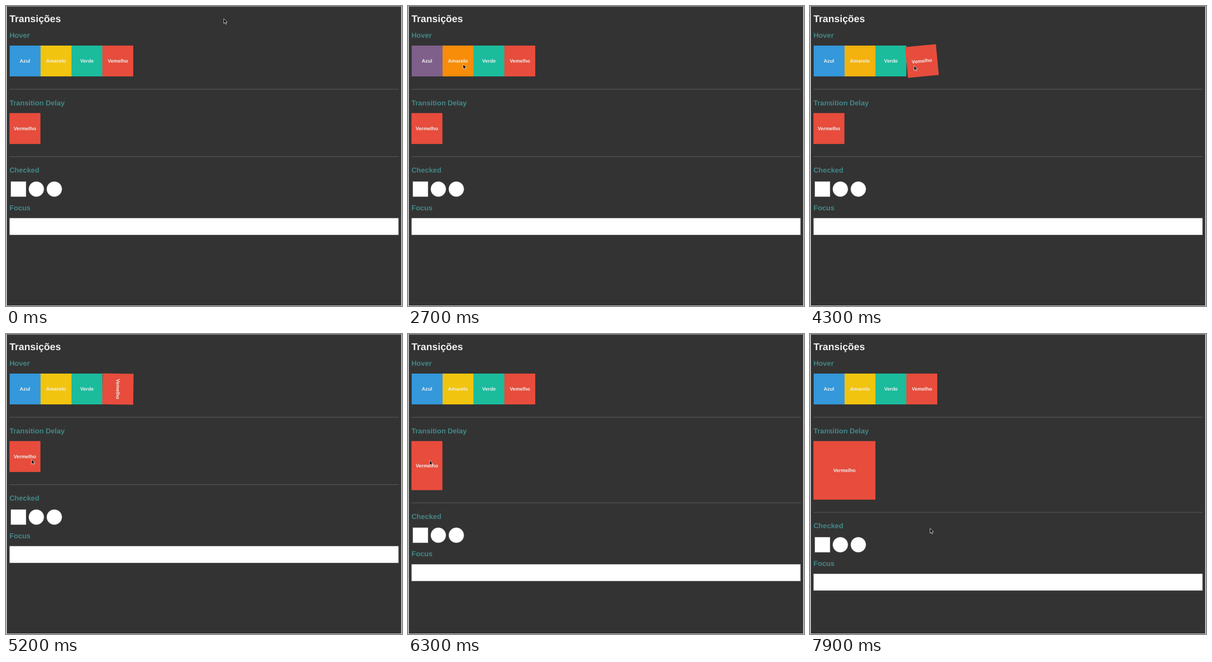
Recreate the animation shown at these times as an HTML page. Size 859 by 652 pixels, loop 8 s.

```html
<!DOCTYPE html>
<html lang="pt">
<head>
<meta charset="utf-8">
<title>Transições</title>
<style>
html, body { margin: 0; width: 100%; height: 100%; overflow: hidden; background: #333; }
svg { display: block; width: 859px; height: 652px; font-family: "Liberation Sans", Arial, sans-serif; font-weight: bold; text-rendering: geometricPrecision; }
.h1 { font-size: 21.4px; fill: #f0f0f0; }
.h2 { font-size: 15.55px; fill: #438787; }
.label { font-size: 10.75px; fill: #eef0f0; text-anchor: middle; }
.hr { fill: #565656; }
.field { fill: #fff; stroke: #8c8c8c; stroke-width: .6; }
.crisp { shape-rendering: crispEdges; }
</style>
</head>
<body>
<svg viewBox="0 0 859 652">
  <rect width="859" height="652" fill="#e6e6e6"/>
  <rect width="859" height="1.2" fill="#9a9a9a"/>
  <rect x="1.7" y="1.2" width="855.7" height="649.8" fill="#333"/>
  <text class="h1" x="7.4" y="35">Transições</text>
  <text class="h2" x="7.4" y="69.3">Hover</text>
  <g id="boxes"></g>
  <rect class="hr" x="7.5" y="180.2" width="844.5" height="1.4"/>
  <text class="h2" x="7.4" y="215.8">Transition Delay</text>
  <rect id="delay" x="7.5" y="232.7" fill="#e74c3c"/>
  <text id="delayText" class="label">Vermelho</text>
  <g id="lower">
    <rect class="hr" x="7.5" y="326.7" width="844.5" height="1.4"/>
    <text class="h2" x="7.4" y="362.4">Checked</text>
    <rect class="field" x="10.4" y="381.4" width="33" height="33"/>
    <circle class="field" cx="65.8" cy="397.9" r="16.5"/>
    <circle class="field" cx="104.8" cy="397.9" r="16.5"/>
    <text class="h2" x="7.4" y="444">Focus</text>
    <rect class="field" x="7.8" y="461" width="843.5" height="36.5"/>
  </g>
  <path id="cursor" d="M.4.5V11.1L2.9 8.8 4.5 12.6 6.2 11.9 4.6 8.1H8Z" fill="#0a0a0a" stroke="#fff" stroke-width=".8"/>
</svg>
<script>
const $ = id => document.getElementById(id);
const LOOP = 8000, STEP = 100, SIDE = 67.2, LEFT = 7.55, TOP = 86;
const mix = (a, b, p) => a + (b - a) * p;
const color = (a, b, p) => `rgb(${a.map((v, i) => Math.round(mix(v, b[i], p)))})`;

// CSS "ease": cubic-bezier(.25, .1, .25, 1), solved by bisection
function ease(x) {
  if (x <= 0) return 0;
  if (x >= 1) return 1;
  let lo = 0, hi = 1, s;
  for (let i = 0; i < 24; i++) {
    s = (lo + hi) / 2;
    if (.75 * s * (1 - s) + s ** 3 < x) lo = s; else hi = s;
  }
  return .3 * s * (1 - s) ** 2 + 3 * s * s * (1 - s) + s ** 3;
}

const run = (t, start, dur) => ease((t - start) / dur);

// Transition in, then back from wherever it got to
function hover(t, enter, leave, dur) {
  if (t < leave) return run(t, enter, dur);
  const peak = run(leave, enter, dur);
  return peak * (1 - run(t, leave, dur * peak));
}

// Stops of the pointer: time, x, y
const stops = [
  [0, 472, 27], [300, 468, 20], [1100, 33, 114], [2000, 54, 121], [2700, 119, 126],
  [3700, 201, 129], [4700, 238, 129], [5000, 108, 277], [5200, 55, 272],
  [5800, 46, 274], [7000, 47, 274], [7900, 260, 422]
];
function pointer(t) {
  const i = Math.max(1, stops.findIndex(s => s[0] >= t));
  const [a, b] = [stops[i - 1], stops[i]];
  const p = (1 - Math.cos(Math.PI * (t - a[0]) / (b[0] - a[0]))) / 2;
  return `translate(${mix(a[1], b[1], p)} ${mix(a[2], b[2], p)})`;
}

const [blue, yellow, green, red] = [
  ["Azul", "#3498db"], ["Amarelo", "#f1c40f"], ["Verde", "#1abc9c"], ["Vemelho", "#e74c3c"]
].map(([name, fill], i) => {
  const g = document.createElementNS("http://www.w3.org/2000/svg", "g");
  const h = SIDE / 2, cx = LEFT + SIDE * i + h, cy = TOP + h;
  g.innerHTML = `<rect x="${-h}" y="${-h}" width="${SIDE}" height="${SIDE}" fill="${fill}"/>` +
    `<text class="label" y="3.6">${name}</text>`;
  $("boxes").append(g);
  const rect = g.firstChild;
  const place = (extra = "") => g.setAttribute("transform", `translate(${cx} ${cy}) ${extra}`);
  place();
  return { g, rect, place, paint: c => rect.setAttribute("fill", c) };
});

function draw(t) {
  blue.paint(color([52, 152, 219], [255, 0, 0], hover(t, 1150, 2180, 2000)));
  yellow.paint(color([241, 196, 15], [255, 69, 0], hover(t, 2180, 3350, 2000)));
  green.place(`scale(${1 + .5 * hover(t, 3230, 3880, 500)})`);

  const angle = 360 * hover(t, 3880, 4975, 500);
  red.place(`rotate(${angle})`);
  red.rect.classList.toggle("crisp", angle % 360 === 0);
  const top = angle ? red.g : green.g;
  if ($("boxes").lastChild !== top) $("boxes").append(top);

  const grow = hover(t, 5600, 7680, 2060);
  const w = SIDE * (1 + run(t, 6300, 800)), h = SIDE * (1 + grow);
  $("delay").setAttribute("width", w);
  $("delay").setAttribute("height", h);
  $("delayText").setAttribute("x", 7.4 + w / 2);
  $("delayText").setAttribute("y", 236.3 + h / 2);
  $("lower").setAttribute("transform", `translate(0 ${SIDE * grow})`);

  $("cursor").setAttribute("transform", pointer(t));
}

for (const box of [blue, yellow, green]) box.rect.classList.add("crisp");
const t0 = performance.now();
function frame() {
  const t = (performance.now() - t0) % LOOP;
  draw(Math.floor(t / STEP) * STEP);
  requestAnimationFrame(frame);
}
frame();
</script>
</body>
</html>
```
